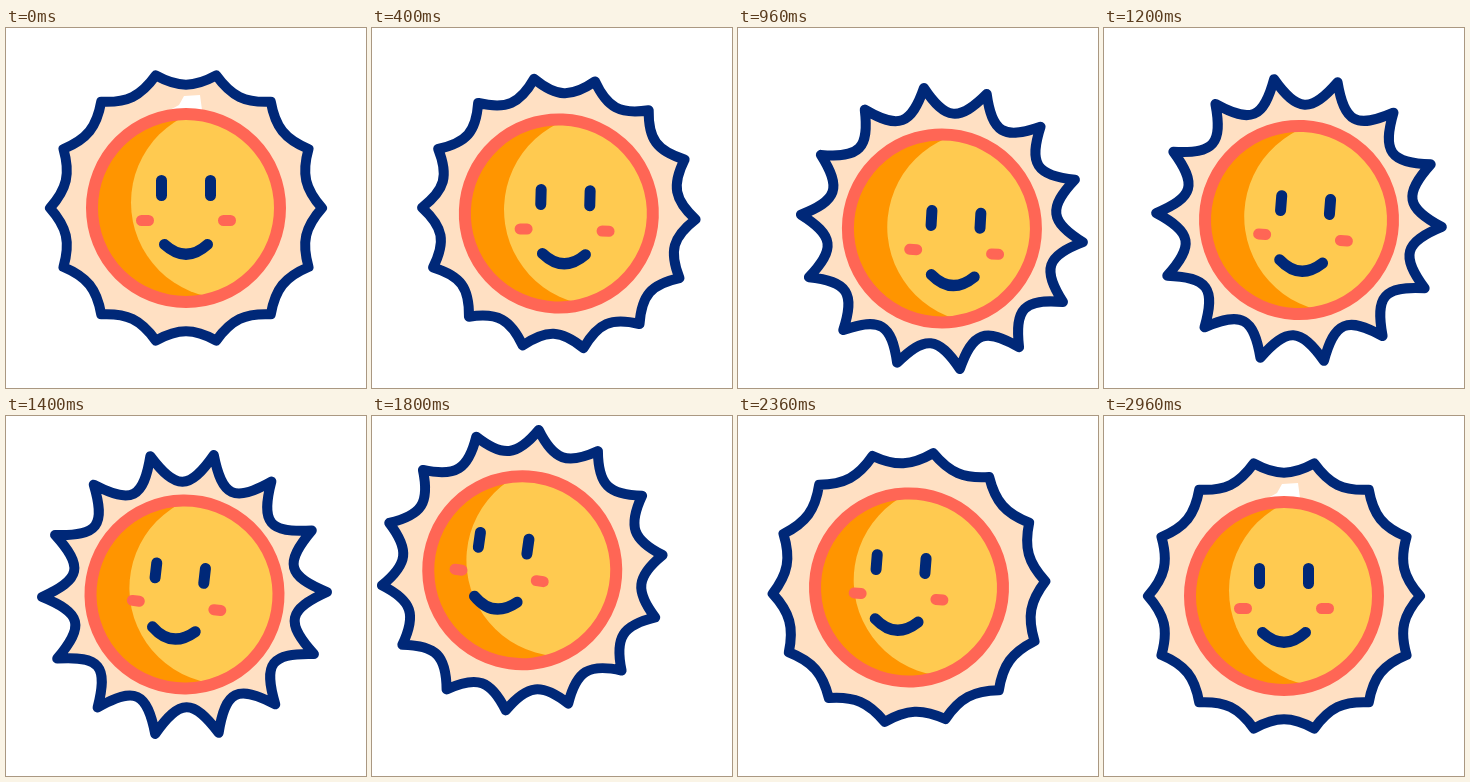
These frames come from a looping animation (360 by 360 pixels, 3 s). An HTML page:

```html
<!DOCTYPE html>
<html lang="en">
<head>
<meta charset="utf-8">
<title>Smiling sun</title>
<style>
  html, body { margin: 0; width: 100%; height: 100%; overflow: hidden; background: #fff; }
  svg { display: block; width: 100%; height: 100%; }
  .line { fill: none; stroke: #002878; stroke-width: 11; stroke-linecap: round; }
  .cheek { stroke: #ff6655; }
</style>
</head>
<body>
<svg viewBox="0 0 360 360">
  <defs><clipPath id="disc"><circle r="90"/></clipPath></defs>
  <g id="sun">
    <g id="body">
      <path id="rays" fill="#ffe0c3" stroke="#002878" stroke-width="10" stroke-linejoin="round"/>
      <path id="glint" fill="#fff" d="M-16 -98L-7 -103L-2 -112L14 -113L16 -98Z"/>
      <circle r="90" fill="#ff9500"/>
      <circle cx="41" cy="-5.5" r="96" fill="#ffca50" clip-path="url(#disc)"/>
      <circle r="94" fill="none" stroke="#ff6655" stroke-width="12"/>
    </g>
    <g id="face">
      <path class="line" d="M-24.5 -27.5V-12.5M24.5 -27.5V-12.5"/>
      <path class="line cheek" d="M-44.5 12.5H-37.5M37.5 12.5H44.5"/>
      <path class="line" d="M-21.5 36.5Q0 56 21.5 36.5"/>
    </g>
  </g>
</svg>
<script>
const LOOP = 3000, STEP = 40, RAYS = 14;

// time, x, y, turn, tip radius, valley radius, face x, face y, face tilt
const poses = [
  [80, 180, 180, 0, 136, 123.5, 0, 0, 0],
  [680, 196.5, 193.5, 5, 138.5, 117, 12, 9, 3],
  [940, 204, 200.5, 5.6, 141.5, 115.5, 13, 11, 3.2],
  [1200, 195, 192, 2.8, 143, 115.5, 5, 5, 4.5],
  [1400, 178.5, 178.5, -1, 142.5, 113, -6.5, -1.5, 6.5],
  [1830, 150, 154, -6.2, 141, 120.5, -21.5, -7.2, 8],
  [2360, 171, 171.5, -2.6, 136.5, 124.5, -9.5, -3.5, 4.5],
  [2960, 180, 180, 0, 136, 123.5, 0, 0, 0]
];

const el = id => document.getElementById(id);
const sun = el('sun'), body = el('body'), rays = el('rays'), glint = el('glint'), face = el('face');

const rise = (i, k) => (poses[i + 1][k] - poses[i][k]) / (poses[i + 1][0] - poses[i][0]);

// Flat at peaks and ends, harmonic mean of neighbouring slopes elsewhere
function slope(i, k) {
  if (i === 0 || i === poses.length - 1) return 0;
  const a = rise(i - 1, k), b = rise(i, k);
  return a * b > 0 ? 2 * a * b / (a + b) : 0;
}

function poseAt(t) {
  const last = poses.length - 1;
  if (t <= poses[0][0]) return poses[0];
  if (t >= poses[last][0]) return poses[last];
  const i = poses.findIndex(p => p[0] > t) - 1;
  const a = poses[i], b = poses[i + 1], d = b[0] - a[0];
  const u = (t - a[0]) / d, v = 1 - u;
  return a.map((p, k) =>
    p * v * v * (1 + 2 * u) + b[k] * u * u * (3 - 2 * u) +
    d * u * v * (slope(i, k) * v - slope(i + 1, k) * u));
}

function rayPath(tip, valley) {
  const step = 2 * Math.PI / RAYS;
  const pull = (valley - 0.25 * tip * Math.cos(step / 2)) / 0.75;
  const at = (n, r) => `${(r * Math.cos(n * step)).toFixed(2)} ${(r * Math.sin(n * step)).toFixed(2)}`;
  let d = 'M' + at(0, tip);
  for (let n = 0; n < RAYS; n++) {
    d += `C${at(n + 0.36, pull)} ${at(n + 0.64, pull)} ${at(n + 1, tip)}`;
  }
  return d + 'Z';
}

function draw() {
  const now = performance.now() % LOOP;
  const t = Math.floor(now / STEP) * STEP;
  const [, x, y, turn, tip, valley, fx, fy, tilt] = poseAt(t);
  sun.setAttribute('transform', `translate(${x} ${y})`);
  body.setAttribute('transform', `rotate(${turn})`);
  face.setAttribute('transform', `translate(${fx} ${fy}) rotate(${tilt})`);
  rays.setAttribute('d', rayPath(tip, valley));
  glint.setAttribute('visibility', t < 120 || t >= 2960 ? 'visible' : 'hidden');
  requestAnimationFrame(draw);
}
draw();
</script>
</body>
</html>
```
